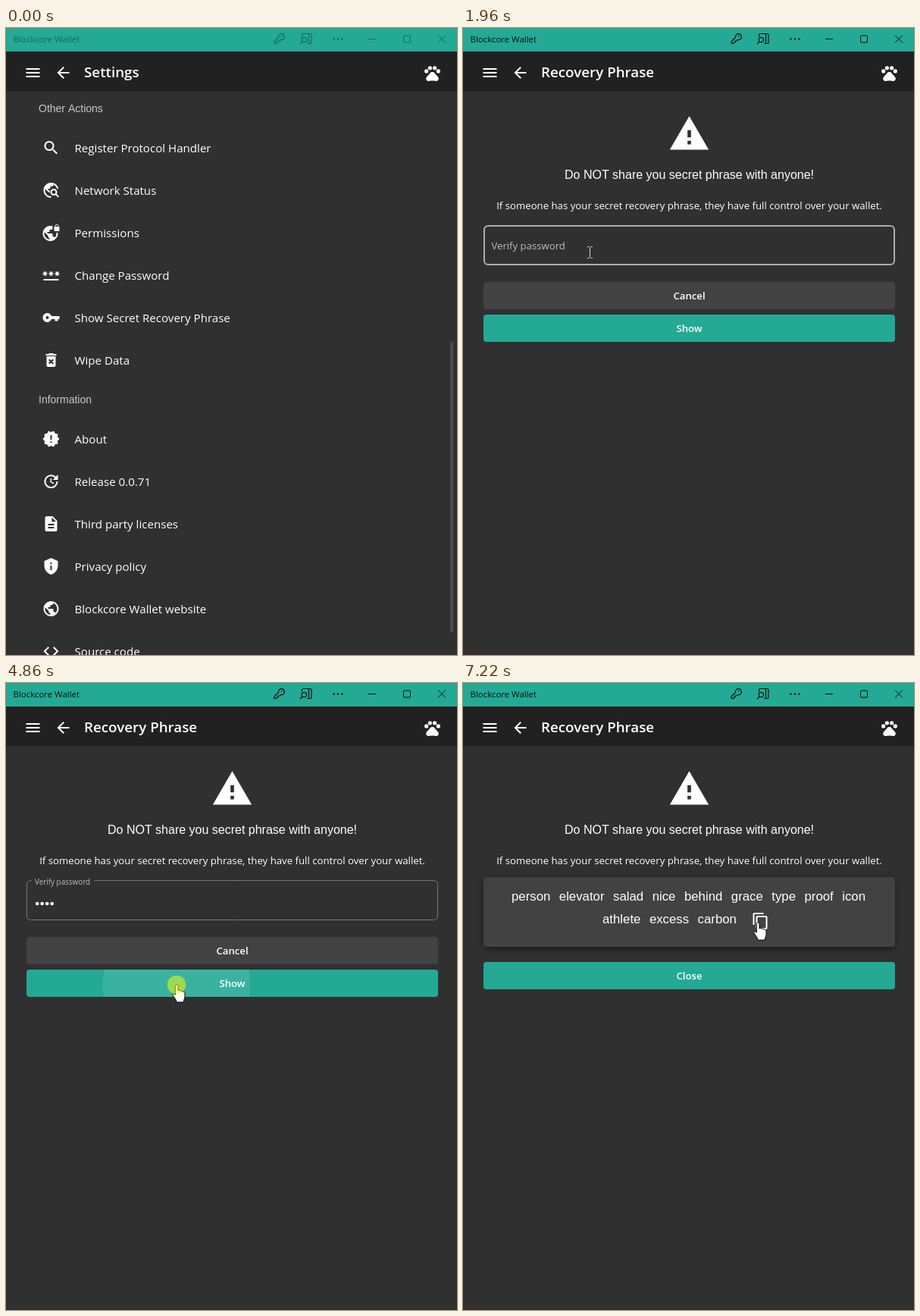
These frames come from a looping animation (595x827 px, 7610 ms). An HTML page with a canvas:

```html
<!DOCTYPE html>
<html lang="en">
<head>
<meta charset="utf-8">
<title>Wallet settings</title>
<style>
html, body { margin: 0; width: 100%; height: 100%; overflow: hidden; background: #303030; }
canvas { display: block; width: 595px; height: 827px; }
</style>
</head>
<body>
<canvas id="stage" width="595" height="827"></canvas>
<script>
const ctx = document.getElementById('stage').getContext('2d', { alpha: false });
const LOOP = 7610;
const TEAL = '#24a994', BG = '#303030', CARD = '#424242';
const UI = '"Open Sans", "Noto Sans", sans-serif';
const PLAIN = '"Liberation Sans", Arial, sans-serif';

// Bursts of screen updates: first, last, count
const BURSTS = [
  [530, 1170, 9], [1330, 1490, 3], [1730, 2440, 10], [2520, 2600, 2], [2750, 2750, 1],
  [2990, 2990, 1], [3140, 3140, 1], [3370, 3370, 1], [3530, 3530, 1], [3830, 4550, 10],
  [4860, 5100, 4], [5720, 6440, 10], [6900, 7060, 3], [7220, 7220, 1]
];
// Updates fall on whole hundredths of a second
const tick = (a, b, u) => Math.floor((a + (b - a) * u) / 10) * 10;
const TICKS = BURSTS.flatMap(([a, b, n]) =>
  Array.from({ length: n }, (_, i) => tick(a, b, i / Math.max(1, n - 1))));

// Pointer path: time, x, y
const POINTER = [
  [530, 12, 390], [810, 263, 396], [1170, 156, 384], [1650, 156, 384], [1960, 167.5, 296],
  [2440, 165.5, 290], [3750, 165.5, 290], [4550, 225, 398], [5640, 225, 398], [6440, 389, 316]
];
const KEYS = [2990, 3140, 3370, 3530];
const PRESSES = [[1330, 1490], [2520, 2600], [4860, 5020], [6900, 7060]];

const icon = d => new Path2D(d);
const ICONS = {
  search: icon('M15.5 14h-.79l-.28-.27C15.41 12.59 16 11.11 16 9.5 16 5.91 13.09 3 9.5 3S3 5.91 3 9.5 5.91 16 9.5 16c1.61 0 3.09-.59 4.23-1.57l.27.28v.79l5 4.99L20.49 19l-4.99-5zm-6 0C7.01 14 5 11.99 5 9.5S7.01 5 9.5 5 14 7.01 14 9.5 11.99 14 9.5 14z'),
  explore: icon('M19.3 16.9c.4-.7.7-1.5.7-2.4 0-2.5-2-4.5-4.5-4.5S11 12 11 14.5s2 4.5 4.5 4.5c.9 0 1.7-.3 2.4-.7l3.2 3.2 1.4-1.4-3.2-3.2zm-3.8.1c-1.4 0-2.5-1.1-2.5-2.5s1.1-2.5 2.5-2.5 2.5 1.1 2.5 2.5-1.1 2.5-2.5 2.5zM12 20v2C6.48 22 2 17.52 2 12S6.48 2 12 2c4.84 0 8.87 3.44 9.8 8h-2.07c-.64-2.46-2.4-4.47-4.73-5.41V5c0 1.1-.9 2-2 2h-2v2c0 .55-.45 1-1 1H8v2h2v3H9l-4.79-4.79C4.08 10.79 4 11.38 4 12c0 4.41 3.59 8 8 8z'),
  lock: icon('M22 4v-.5C22 2.12 20.88 1 19.5 1S17 2.12 17 3.5V4c-.55 0-1 .45-1 1v4c0 .55.45 1 1 1h5c.55 0 1-.45 1-1V5c0-.55-.45-1-1-1zm-.8 0h-3.4v-.5c0-.94.76-1.7 1.7-1.7s1.7.76 1.7 1.7V4zm-2.28 8c.04.33.08.66.08 1 0 2.08-.8 3.97-2.1 5.39-.26-.81-1-1.39-1.9-1.39h-1v-3c0-.55-.45-1-1-1H7v-2h2c.55 0 1-.45 1-1V8h2c1.1 0 2-.9 2-2V3.46c-.95-.3-1.95-.46-3-.46C5.48 3 1 7.48 1 13s4.48 10 10 10 10-4.48 10-10c0-.34-.02-.67-.05-1h-2.03zM10 20.93c-3.95-.49-7-3.85-7-7.93 0-.62.08-1.21.21-1.79L8 16v1c0 1.1.9 2 2 2v1.93z'),
  password: icon('M2 17h20v2H2z'),
  key: icon('M12.65 10C11.83 7.67 9.61 6 7 6c-3.31 0-6 2.69-6 6s2.69 6 6 6c2.61 0 4.83-1.67 5.65-4H17v2.5h4V14h2v-4H12.65zM7 14c-1.1 0-2-.9-2-2s.9-2 2-2 2 .9 2 2-.9 2-2 2z'),
  wipe: icon('M6 19c0 1.1.9 2 2 2h8c1.1 0 2-.9 2-2V7H6v12zm2.46-7.12l1.41-1.41L12 12.59l2.12-2.12 1.41 1.41L13.41 14l2.12 2.12-1.41 1.41L12 15.41l-2.12 2.12-1.41-1.41L10.59 14l-2.13-2.12zM15.5 4l-1-1h-5l-1 1H5v2h14V4z'),
  about: icon('M23 12l-2.44-2.78.34-3.68-3.61-.82-1.89-3.18L12 3 8.6 1.54 6.71 4.72l-3.61.81.34 3.68L1 12l2.44 2.78-.34 3.69 3.61.82 1.89 3.18L12 21l3.4 1.46 1.89-3.18 3.61-.82-.34-3.68L23 12zm-10 5h-2v-2h2v2zm0-4h-2V7h2v6z'),
  update: icon('M21 10.12h-6.78l2.74-2.82c-2.73-2.7-7.15-2.8-9.88-.1-2.73 2.71-2.73 7.08 0 9.79s7.15 2.71 9.88 0C18.32 15.65 19 14.08 19 12.1h2c0 1.98-.88 4.55-2.64 6.29-3.51 3.48-9.21 3.48-12.72 0-3.5-3.47-3.53-9.11-.02-12.58s9.14-3.47 12.65 0L21 3v7.12zM12.5 8v4.25l3.5 2.08-.72 1.21L11 13V8h1.5z'),
  page: icon('M14 2H6c-1.1 0-1.99.9-1.99 2L4 20c0 1.1.89 2 1.99 2H18c1.1 0 2-.9 2-2V8l-6-6zm2 16H8v-2h8v2zm0-4H8v-2h8v2zm-3-5V3.5L18.5 9H13z'),
  shield: icon('M12 1L3 5v6c0 5.55 3.84 10.74 9 12 5.16-1.26 9-6.45 9-12V5l-9-4zm-1 6h2v2h-2V7zm0 4h2v6h-2v-6z'),
  globe: icon('M12 2C6.48 2 2 6.48 2 12s4.48 10 10 10 10-4.48 10-10S17.52 2 12 2zm-1 17.93c-3.95-.49-7-3.85-7-7.93 0-.62.08-1.21.21-1.79L9 15v1c0 1.1.9 2 2 2v1.93zm6.9-2.54c-.26-.81-1-1.39-1.9-1.39h-1v-3c0-.55-.45-1-1-1H8v-2h2c.55 0 1-.45 1-1V7h2c1.1 0 2-.9 2-2v-.41c2.93 1.19 5 4.06 5 7.41 0 2.08-.8 3.97-2.1 5.39z'),
  code: icon('M9.4 16.6L4.8 12l4.6-4.6L8 6l-6 6 6 6 1.4-1.4zm5.2 0l4.6-4.6-4.6-4.6L16 6l6 6-6 6-1.4-1.4z'),
  menu: icon('M3 6h18v2H3zM3 11h18v2H3zM3 16h18v2H3z'),
  back: icon('M20 11H7.83l5.59-5.59L12 4l-8 8 8 8 1.41-1.41L7.83 13H20v-2z'),
  pets: icon('M17.34 14.86c-.87-1.02-1.6-1.89-2.48-2.91-.46-.54-1.05-1.08-1.75-1.32-.7-.2-1.5-.2-2.23 0-.7.24-1.28.78-1.75 1.32-.87 1.02-1.6 1.89-2.48 2.91-1.31 1.31-2.92 2.76-2.62 4.79.29 1.02 1.02 2.03 2.33 2.32.73.15 3.06-.44 5.54-.44h.18c2.48 0 4.81.58 5.54.44 1.31-.29 2.04-1.31 2.33-2.32.31-2.04-1.3-3.49-2.61-4.79z'),
  warning: icon('M1 21h22L12 2 1 21zm12-3h-2v-2h2v2zm0-4h-2v-4h2v4z'),
  copy: icon('M16 1H4c-1.1 0-2 .9-2 2v14h2V3h12V1zm3 4H8c-1.1 0-2 .9-2 2v14c0 1.1.9 2 2 2h11c1.1 0 2-.9 2-2V7c0-1.1-.9-2-2-2zm0 16H8V7h11v14z')
};
const star = icon('M3.15 12.95L4 11.47l.85 1.48 1.3-.75-.85-1.48H7v-1.5H5.3l.85-1.47L4.85 7 4 8.47 3.15 7l-1.3.75.85 1.47H1v1.5h1.7l-.85 1.48z');
for (let i = 0; i < 3; i++) ICONS.password.addPath(star, new DOMMatrix([1, 0, 0, 1, 8 * i, 0]));
for (const [x, y] of [[4.5, 9.5], [9, 5.5], [15, 5.5], [19.5, 9.5]]) {
  ICONS.pets.moveTo(x + 2.5, y);
  ICONS.pets.arc(x, y, 2.5, 0, 7);
}
const HAND = icon('M-1.7 1.8C-1.7-.6 2-.6 2 1.8V8C2.2 6.8 5.2 6.8 5.4 8.6 5.8 7.4 8.2 7.6 8.4 9.4 8.8 8.4 11 8.8 11 10.8V16C11 18 9.4 19.5 9.2 23H0C0 20-3 17.5-4.6 14.5-6 12.2-3.6 10.6-1.7 13.2Z');
const ARROW = icon('M0 0V16.5L3.8 13 6.2 18.5 8.6 17.4 6.2 12H11.5Z');

const LIST = [
  ['search', 'Register Protocol Handler', 158], ['explore', 'Network Status', 214],
  ['lock', 'Permissions', 270], ['password', 'Change Password', 326],
  ['key', 'Show Secret Recovery Phrase', 382], ['wipe', 'Wipe Data', 438],
  ['about', 'About', 542], ['update', 'Release 0.0.71', 598],
  ['page', 'Third party licenses', 654], ['shield', 'Privacy policy', 710],
  ['globe', 'Blockcore Wallet website', 766], ['code', 'Source code', 822]
];
const PHRASE = [
  ['person elevator salad nice behind grace type proof icon', 64, 287],
  ['athlete excess carbon', 184, 317]
];

function text(str, x, y, font, color = '#fff', align = 'left') {
  ctx.font = font;
  ctx.fillStyle = color;
  ctx.textAlign = align;
  ctx.fillText(str, x, y);
}

function rect(x, y, w, h, color, r = 0) {
  ctx.fillStyle = color;
  ctx.beginPath();
  ctx.roundRect(x, y, w, h, r);
  ctx.fill();
}

function disc(x, y, r, color) {
  ctx.fillStyle = color;
  ctx.beginPath();
  ctx.arc(x, y, r, 0, Math.PI * 2);
  ctx.fill();
}

function drawIcon(name, cx, cy, size = 24) {
  ctx.save();
  ctx.translate(cx - size / 2, cy - size / 2);
  ctx.scale(size / 24, size / 24);
  ctx.fillStyle = '#fff';
  ctx.fill(ICONS[name]);
  ctx.restore();
}

function line(d, color, width) {
  ctx.strokeStyle = color;
  ctx.lineWidth = width;
  ctx.stroke(new Path2D(d));
}

// Growing circle clipped to a box
function ripple(age, x, y, reach, [bx, by, bw, bh, br], alpha) {
  const k = 1 - (1 - Math.min(1, age / 450)) ** 3;
  ctx.save();
  ctx.beginPath();
  ctx.roundRect(bx, by, bw, bh, br);
  ctx.clip();
  disc(x, y, reach * k, `rgba(255,255,255,${alpha})`);
  ctx.restore();
}

function pointerAt(t) {
  const i = POINTER.findIndex(p => p[0] > t);
  if (i < 0) return POINTER.at(-1).slice(1);
  const [t0, x0, y0] = POINTER[i - 1], [t1, x1, y1] = POINTER[i];
  const u = (t - t0) / (t1 - t0), k = u * u * (3 - 2 * u);
  return [x0 + (x1 - x0) * k, y0 + (y1 - y0) * k];
}

function titleBar(active) {
  const ink = active ? '#06120f' : '#176a5e';
  rect(0, 0, 595, 31, TEAL);
  text('Blockcore Wallet', 9.5, 19, '11.45px ' + UI, ink);
  line('M359.5 12.5a4 4 0 1 1 3 3l-1.5 1.5h-2v2h-2v1.5h-3v-2.8z', ink, 1.2);
  disc(363.8, 10.8, 0.9, ink);
  line('M390.5 11.5V9.5a2 2 0 0 1 2-2h8.5a2 2 0 0 1 2 2v9a2 2 0 0 1-2 2h-4M399.5 7.5v13M396.5 15.5a3.2 3.2 0 1 1-6.4 0a3.2 3.2 0 1 1 6.4 0M391 18l-3 3', ink, 1.2);
  for (const x of [432.5, 438, 443.5]) disc(x, 14.5, 1.2, ink);
  line('M478 14.5h10M525.5 10h7a1 1 0 0 1 1 1v7a1 1 0 0 1-1 1h-7a1 1 0 0 1-1-1v-7a1 1 0 0 1 1-1zM570 9.5l10 10M580 9.5l-10 10', ink, 1);
}

function header(title) {
  rect(0, 31, 595, 52, '#212121');
  drawIcon('menu', 35.5, 59);
  drawIcon('back', 75.5, 59);
  drawIcon('pets', 562.5, 59.5, 25);
  text(title, 103, 65, '600 18.8px ' + UI);
}

function settings(t) {
  if (t >= 1330) ripple(t - 1240, 156, 384, 414, [27, 354, 543, 56, 0], 0.13);
  text('Other Actions', 43, 111, '14px ' + PLAIN, '#c8c8c8');
  text('Information', 43, 495, '14px ' + PLAIN, '#c8c8c8');
  for (const [name, label, y] of LIST) {
    drawIcon(name, 59.5, y);
    text(label, 90.5, y + 6, '500 15.1px ' + UI);
  }
  rect(586, 414, 4, 383, '#4d4d4d');
}

function button(y, color) {
  rect(27, y, 543, 36, color, 4);
}

function caption(label, y) {
  text(label, 298.5, y + 23, '600 13.2px ' + UI, '#fff', 'center');
}

function field(t, py) {
  const focused = t >= 2520 && t < 4860;
  const hover = !focused && py > 260 && py < 313;
  const lift = t < 2520 ? 0 : t < 2600 ? 0.5 : 1;
  const w = focused || hover ? 2 : 1;
  ctx.strokeStyle = focused ? TEAL : hover ? '#adadad' : '#787878';
  ctx.lineWidth = w;
  ctx.beginPath();
  ctx.roundRect(27 + w / 2, 260 + w / 2, 543 - w, 53 - w, 5);
  ctx.stroke();
  if (lift) rect(34, 259, 82.5, 4, BG);
  text('Verify password', 37.5 + lift * 0.5, 292 - 26 * lift,
    `${13.15 - 3.28 * lift}px ${UI}`, focused ? TEAL : '#bcbcbc');

  const count = KEYS.filter(k => k <= t).length;
  for (let i = 0; i < count; i++) disc(41.2 + 6.5 * i, 291, 2.3, '#fff');
  const blink = (t >= 2750 && t < 2990) || t >= 4060;
  if (focused && !blink) rect(38 + Math.round(6.4 * count), 281, 1, 18, TEAL);
  if (focused && count) line('M536.5 292c2-11 18-11 20 0M550.5 292.5a4 4 0 1 1-8 0a4 4 0 1 1 8 0', '#0c0c0c', 1.5);
}

function phraseCard(t) {
  ctx.save();
  ctx.shadowColor = 'rgba(0,0,0,.45)';
  ctx.shadowBlur = 8;
  ctx.shadowOffsetY = 3;
  rect(27, 256, 543, 92, CARD, 4);
  ctx.restore();
  for (const [words, left, y] of PHRASE) {
    let x = left;
    for (const word of words.split(' ')) {
      text(word, x, y, '16.8px ' + PLAIN);
      x += ctx.measureText(word).width + 11.5;
    }
  }
  if (t >= 6900 && t < 7220) ripple(t - 6810, 393, 312, 20, [373, 292, 40, 40, 20], 0.1);
  drawIcon('copy', 392.5, 314);
  button(368, TEAL);
  caption('Close', 368);
}

function recovery(t, py) {
  drawIcon('warning', 298.5, 139.5, 56);
  text('Do NOT share you secret phrase with anyone!', 298.5, 199, '16px ' + PLAIN, '#fff', 'center');
  text('If someone has your secret recovery phrase, they have full control over your wallet.',
    298.5, 239, '500 13.2px ' + UI, '#fff', 'center');
  if (t >= 5100) return phraseCard(t);
  field(t, py);
  button(335, CARD);
  caption('Cancel', 335);
  button(378, TEAL);
  if (t >= 4860) ripple(t - 4813, 225, 398, 346, [27, 378, 543, 36, 4], 0.1);
  caption('Show', 378);
}

function pointerShape(t, x, y) {
  if (t < 1490) return x < 27 ? 'arrow' : 'hand';
  if (t >= 5100) {
    const onCopy = Math.hypot(x - 393, y - 312) < 20;
    return onCopy || (y >= 368 && y <= 404) ? 'hand' : 'arrow';
  }
  if (y >= 260 && y <= 313) return 'beam';
  return (y >= 335 && y <= 371) || (y >= 378 && y <= 414) ? 'hand' : 'arrow';
}

function pointer(t, x, y) {
  ctx.save();
  ctx.translate(Math.floor(x), Math.round(y));
  const shape = pointerShape(t, x, y);
  if (shape === 'beam') {
    line('M-3 -7.5H-.5M1.5 -7.5H4M.5 -7V7M-3 7.5H-.5M1.5 7.5H4', '#d8d8d8', 1);
  } else {
    const path = shape === 'hand' ? HAND : ARROW;
    ctx.fillStyle = '#fff';
    ctx.fill(path);
    ctx.strokeStyle = '#000';
    ctx.lineWidth = 1;
    ctx.stroke(path);
  }
  if (PRESSES.some(([a, b]) => t >= a && t < b)) disc(0, 0, 12.3, 'rgba(255,255,0,.5)');
  ctx.restore();
}

function draw(t) {
  const shown = t >= 530;
  const [x, y] = shown ? pointerAt(t) : [0, 0];
  rect(0, 0, 595, 827, BG);
  if (t < 1490) settings(t);
  else recovery(t, y);
  titleBar(t >= 1330);
  header(t < 1490 ? 'Settings' : 'Recovery Phrase');
  if (shown) pointer(t, x, y);
}

const start = performance.now();
function loop() {
  const t = (performance.now() - start) % LOOP;
  draw(TICKS.findLast(k => k <= t) ?? 0);
  requestAnimationFrame(loop);
}
loop();
</script>
</body>
</html>
```
